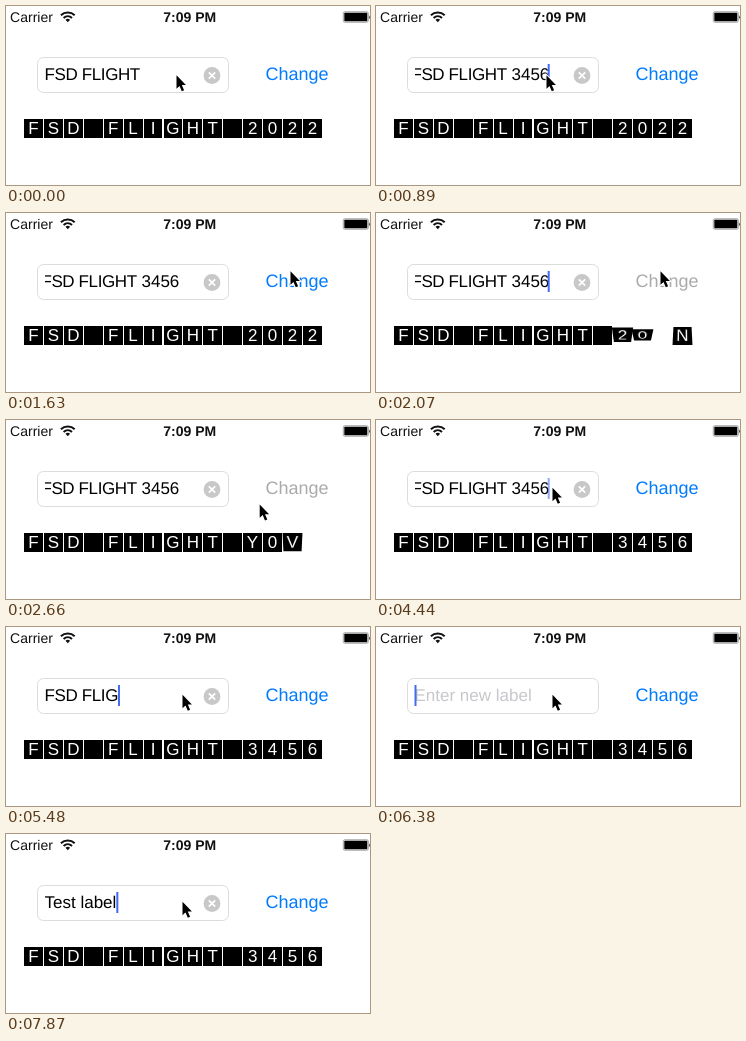
An HTML page that plays this animation: 364 by 179 pixels, repeating every 8000 ms.

```html
<!DOCTYPE html>
<html lang="en">
<head>
<meta charset="utf-8">
<title>Split-flap label</title>
<style>
  html, body { margin: 0; width: 100%; height: 100%; overflow: hidden; background: #fff; }
  svg { position: absolute; left: 0; top: 0; }
  text, .tile { font-family: "Liberation Sans", Arial, sans-serif; white-space: pre; }
  text { text-rendering: geometricPrecision; }
  .field { font-size: 17px; }
  .tight { letter-spacing: -.38px; }
  .tile {
    position: absolute; top: 113px; width: 18.9px; height: 19.3px;
    background: #000; color: #fff; font-size: 17px; line-height: 20px; text-align: center;
  }
</style>
</head>
<body>
<svg width="364" height="179" viewBox="0 0 364 179">
  <clipPath id="clip"><rect x="39" y="54" width="136" height="30"/></clipPath>

  <g fill="#111">
    <text x="4.1" y="15.7" font-size="14">Carrier</text>
    <text x="157.3" y="15.7" font-size="14" font-weight="bold">7:09 PM</text>
    <g fill="none" stroke="#111" stroke-width="2">
      <path d="M54.9 9.2a10 10 0 0 1 13.8 0"/>
      <path d="M57.6 12a6.2 6.2 0 0 1 8.4 0"/>
    </g>
    <path d="M61.8 16.2l-2.3-2.4a3.3 3.3 0 0 1 4.6 0z"/>
    <rect x="337.3" y="5.8" width="25" height="10.4" rx="1.5" fill="#fff" stroke="#888" stroke-width=".8"/>
    <rect x="338.3" y="6.8" width="23" height="8.4" rx=".6" fill="#000"/>
    <path d="M363 9.3q1.4 1.9 0 3.9z"/>
  </g>

  <rect x="31.5" y="51.5" width="191" height="35" rx="6" fill="#fff" stroke="#dcdcdc"/>
  <text id="hint" class="field" x="38.5" y="74.4" fill="#c7c7cc">Enter new label</text>
  <g clip-path="url(#clip)">
    <text id="entry" class="field" y="74.4"><tspan id="head" class="tight"></tspan><tspan id="tail"></tspan></text>
  </g>
  <rect id="caret" y="58" width="2" height="21" fill="#426bf2"/>
  <g id="clear">
    <circle cx="206" cy="69.5" r="8.4" fill="#c8c8c8"/>
    <path d="M202.8 66.3l6.4 6.4m0-6.4l-6.4 6.4" stroke="#fff" stroke-width="1.7"/>
  </g>
  <text id="button" x="259.4" y="74.1" font-size="18">Change</text>
  <path id="mouse" d="M.5 .3v13.4l3-2.8 2.3 5.4 2.3-1-2.3-5.2h4.1z" fill="#000"
    stroke="#fff" stroke-width="2" paint-order="stroke"/>
</svg>

<script>
const LOOP = 8000, LEFT = 38.5, RIGHT = 173.3;
const FLIGHT = "FSD FLIGHT 3456", TEST = "Test label";
const $ = id => document.getElementById(id);
const clamp = (v, lo, hi) => Math.min(Math.max(v, lo), hi);
const smooth = u => u * u * (3 - 2 * u);
const ease = (t, a, b) => smooth(clamp((t - a) / (b - a), 0, 1));

// The screen refreshes in coarse steps
const refresh = t => 1630 + Math.floor((t - 1630) / 146) * 146;

// Letters that pass through each flipping tile
const reels = ["2K7YDBU93", "0QM0XF1H4", "2RJVCK5", "2NTKGM4P6"];

const tiles = [..."FSD FLIGHT 2022"].map((c, i) => {
  const el = document.createElement("div");
  el.className = "tile";
  el.style.left = 18 + i * 19.93 + "px";
  el.textContent = c;
  document.body.append(el);
  return el;
});

// Keys struck in quick pairs
const strokes = t => t < 0 ? 0 : 2 * Math.floor(t / 440) + (t % 440 < 145 ? 1 : 2);

function typed(t) {
  if (t < 4590) return FLIGHT.slice(0, 11 + Math.min(4, strokes(t - 300)));
  if (t < 5030) return FLIGHT.slice(0, 14);
  if (t < 6830) return FLIGHT.slice(0, Math.max(0, 13 - 1.5 * Math.floor((t - 5030) / 150)));
  if (t < 7270) return TEST.slice(0, strokes(t - 6830));
  return TEST.slice(0, 3 + 1.75 * Math.floor((t - 7270) / 150));
}

// Steady while typing, blinking once a second when idle
function caretAlpha(t) {
  if (t < 300) return 0;
  if (t < 1340 || t >= 4590) return 1;
  return clamp((Math.abs(t % 1000 - 700) - 200) / 100, 0, 1);
}

function drawField(t) {
  const s = typed(t), cut = s[0] === "F" ? 10 : 0;
  $("head").textContent = s.slice(0, cut);
  $("tail").textContent = s.slice(cut);
  const w = s ? $("entry").getComputedTextLength() : 0;
  const x = Math.min(LEFT, RIGHT - w);
  $("entry").setAttribute("x", x);
  $("caret").setAttribute("x", Math.min(x + w, 171.7));
  $("caret").setAttribute("opacity", caretAlpha(t));
  $("hint").style.display = s ? "none" : "";
  $("clear").style.display = s ? "" : "none";
}

// To the button, back along an arc, then aside
function drawMouse(t) {
  const out = ease(t, 1250, 1630), back = ease(t, 2390, 3240), aside = ease(t, 3400, 4000);
  const arc = Math.sin(Math.PI * clamp((t - 2390) / 850, 0, 1));
  const x = 170 + 114 * out - 136 * back + 28 * aside;
  const y = 69 - 11 * out + 6 * back + 3.5 * aside + 30 * arc;
  $("mouse").setAttribute("transform", `translate(${x} ${y})`);
}

function drawTiles(t) {
  reels.forEach((reel, i) => {
    const u = clamp((t - 2000) / 220 + .055 * i * i, 0, reel.length - 1);
    const angle = 180 * (Math.round(u) - Math.floor(u) - smooth(u % 1));
    const el = tiles[11 + i];
    el.textContent = reel[Math.round(u)];
    el.style.visibility = Math.abs(angle) > 78 ? "hidden" : "";
    el.style.transform = angle ? `perspective(60px) rotateX(${angle}deg)` : "none";
  });
}

function draw(now) {
  const t = now % LOOP, shown = refresh(t);
  drawField(t);
  drawMouse(shown);
  drawTiles(shown);
  $("button").setAttribute("fill", t >= 1930 && t < 3990 ? "#aaa" : "#007aff");
}

const begin = performance.now();
function loop() {
  draw(performance.now() - begin);
  requestAnimationFrame(loop);
}
loop();
</script>
</body>
</html>
```
